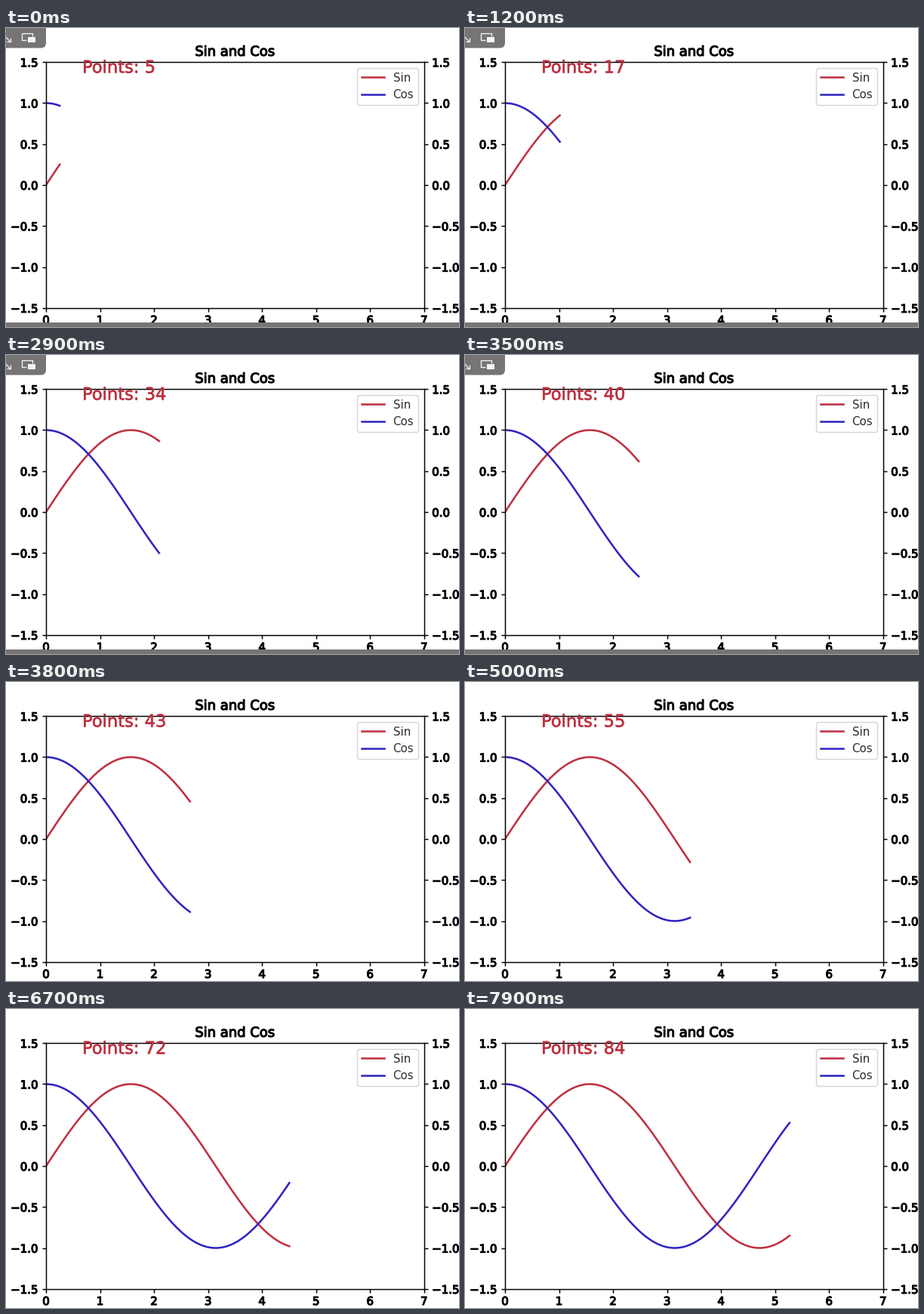
Animation of 600x396 px, one loop 8000 ms. Source, as a matplotlib script:

```python
import numpy as np
import matplotlib.pyplot as plt
from matplotlib.animation import FuncAnimation
from matplotlib.patches import FancyBboxPatch, Rectangle
from matplotlib.patheffects import withStroke

W, H, DPI = 600, 396, 96
K = 1.122  # enlarges matplotlib's default sizes to the stage
FRAMES, INTERVAL, FIRST = 80, 100, 5
RED, BLUE, GRAY, WHITE = "#be3040", "#3024c0", "#777476", "#f4f2f3"

plt.rcParams.update({
    "font.family": "DejaVu Sans",
    "font.size": 10 * K,
    "axes.titlesize": 12 * K,
    "axes.titlepad": 5.6 * K,
    "axes.linewidth": 1.0 * K,
    "lines.linewidth": 1.7 * K,
    "legend.fontsize": 10 * K,
    "patch.linewidth": 1.0 * K,
})
for axis, pad in (("xtick", 2.6), ("ytick", 3.5)):
    plt.rcParams.update({
        f"{axis}.labelsize": 10 * K,
        f"{axis}.major.size": 3.5 * K,
        f"{axis}.major.pad": pad * K,
        f"{axis}.major.width": 1.0 * K,
    })

fig = plt.figure(figsize=(W / DPI, H / DPI), dpi=DPI, facecolor="white")


def pixel_axes(zorder):
    layer = fig.add_axes([0, 0, 1, 1], zorder=zorder)
    layer.set(xlim=(0, W), ylim=(H, 0))
    layer.axis("off")
    return layer


def thicken(text, width, color):
    text.set_path_effects([withStroke(linewidth=width, foreground=color)])


# Chart
left, right, top, bottom = 53, 553.7, 45.2, 370.8
ax = fig.add_axes([left / W, 1 - bottom / H, (right - left) / W, (bottom - top) / H])
ax.set(xlim=(0, 7), ylim=(-1.5, 1.5), xticks=np.arange(8),
       yticks=np.arange(-1.5, 1.6, 0.5))
ax.tick_params(axis="y", right=True, labelright=True)
title = ax.set_title("Sin and Cos")
for label in [title, *ax.get_xticklabels(), *ax.get_yticklabels()]:
    thicken(label, 0.9, "black")

x = np.linspace(0, 2 * np.pi, 100)
sin_line, = ax.plot([], [], color=RED, label="Sin")
cos_line, = ax.plot([], [], color=BLUE, label="Cos")
ax.legend(loc="upper right", labelcolor="#2a2a2a")

counter = pixel_axes(2).text(101, 59.3, "", color=RED, fontsize=15.1 * K)
thicken(counter, 0.4, RED)

# Player controls that fade away
ui = pixel_axes(3)
stroke = dict(color=WHITE, lw=1.0, solid_capstyle="butt")
controls = [
    ui.add_patch(FancyBboxPatch((-20, -20), 73, 46.5, fc=GRAY, ec="none",
                                boxstyle="round,pad=0,rounding_size=7")),
    ui.add_patch(Rectangle((0, 389.7), W, 7, fc=GRAY, ec="none")),
    *ui.plot([-2, 5.5], [10, 18], **stroke),
    *ui.plot([0.5, 5.5, 5.5], [18, 18, 13], **stroke),
    *ui.plot([27, 21, 21, 35, 35], [15.5, 15.5, 7, 7, 11], **stroke),
    ui.add_patch(Rectangle((29, 12), 9.5, 6.5, fc=WHITE, ec="none")),
]


def update(i):
    n = FIRST + i
    sin_line.set_data(x[:n], np.sin(x[:n]))
    cos_line.set_data(x[:n], np.cos(x[:n]))
    counter.set_text(f"Points: {n}")
    alpha = float(np.clip((37 - i) / 2, 0, 1))
    for part in controls:
        part.set_alpha(alpha)
    return [sin_line, cos_line, counter, *controls]


anim = FuncAnimation(fig, update, frames=FRAMES, interval=INTERVAL,
                     repeat=True, repeat_delay=0)
plt.show()
```
